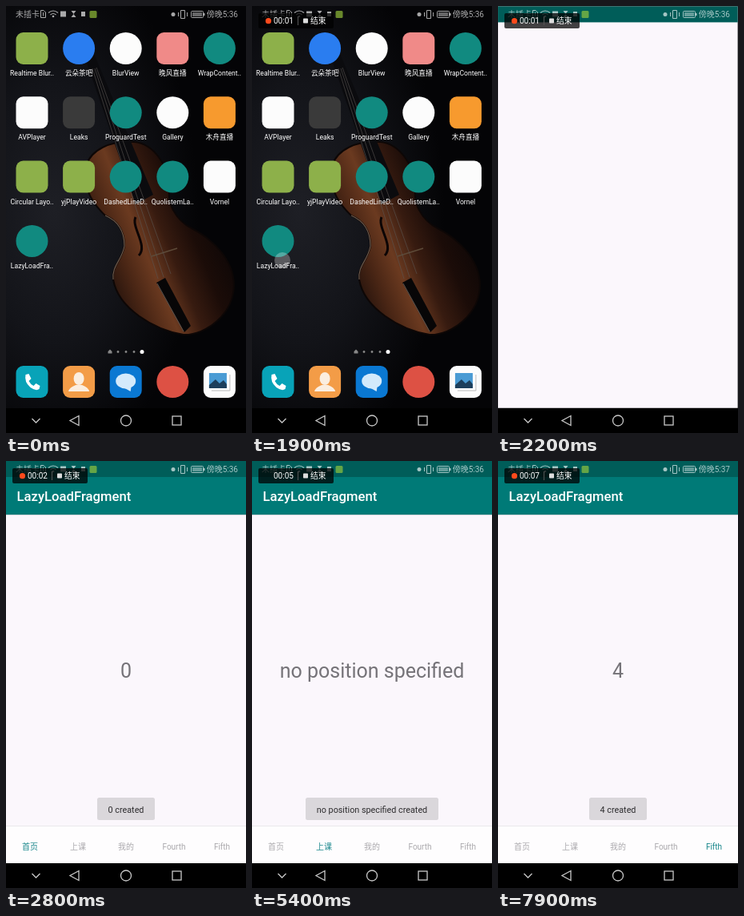
An HTML page for the animation above (8000 ms loop, 300 by 534 pixels).

```html
<!DOCTYPE html>
<html lang="zh-CN">
<head>
<meta charset="utf-8">
<title>Lazy tabs demo</title>
<style>
  html, body { margin: 0; width: 100%; height: 100%; overflow: hidden; background: #000; }
  svg { display: block; width: 100%; height: 100%; }
  text { font-family: Roboto, "Noto Sans CJK SC", "Noto Sans CJK", sans-serif; }
  .mid { text-anchor: middle; }
  .label { font-size: 8.6px; fill: #fff; }
  .status { font-size: 10px; fill: #fff; }
  .line { fill: none; stroke: #fff; }
  #nav .line { stroke: #c9c9c9; stroke-width: 1.3; }
</style>
</head>
<body>
<svg viewBox="0 0 300 534">
  <defs>
    <radialGradient id="wall" cx=".2" cy=".48" r=".6">
      <stop offset="0" stop-color="#1e1f25"/>
      <stop offset=".5" stop-color="#131419"/>
      <stop offset="1" stop-color="#040406"/>
    </radialGradient>
    <linearGradient id="wood" gradientUnits="userSpaceOnUse" x1="110" y1="325" x2="280" y2="255">
      <stop offset="0" stop-color="#1c0e0a"/>
      <stop offset=".2" stop-color="#4a2615"/>
      <stop offset=".36" stop-color="#6b3a20"/>
      <stop offset=".52" stop-color="#371b10"/>
      <stop offset=".7" stop-color="#1b0c08"/>
      <stop offset="1" stop-color="#080506"/>
    </linearGradient>
    <clipPath id="tabClip"><rect y="457" width="300" height="46"/></clipPath>
  </defs>

  <g id="home">
    <rect width="300" height="534" fill="url(#wall)"/>
    <path d="M100 200C106 180 130 168 160 170C185 172 203 200 205 228C200 245 212 268 232 278C255 290 285 315 285 350C284 385 250 412 222 411C185 405 140 378 134 342C132 325 145 318 148 300C148 280 138 268 124 262C106 245 94 222 100 200Z"
      fill="url(#wood)" stroke="#0d0706" stroke-width="2"/>
    <path d="M124 262C138 268 148 280 148 300C145 318 132 325 134 342" fill="none" stroke="#6d5a4c" stroke-width="1.200"/>
    <path d="M98 62L110 60L184 236L162 248Z" fill="#0b0b0e"/>
    <path d="M188 346L199 340L231 400L223 408Z" fill="#070607"/>
    <path d="M189 347L222 407" stroke="#5a534e"/>
    <path d="M182 313L214 303" stroke="#5d4a38" stroke-width="1.500"/>
    <path d="M108 78L190 341M111 78L197 339M113 77L206 335" stroke="#5b5753" stroke-width=".6"/>
    <path d="M162 264C156 276 178 300 166 312" fill="none" stroke="#0c0505" stroke-width="3"/>
    <g id="apps"></g>
    <g id="dock"></g>
    <path d="M127.500 432L130 429.500L132.500 432V434.500H127.500Z" fill="#888"/>
    <g fill="#888"><circle cx="140" cy="432.500" r="1.400"/><circle cx="150" cy="432.500" r="1.400"/><circle cx="160" cy="432.500" r="1.400"/></g>
    <circle cx="170" cy="432.500" r="2.500" fill="#fff"/>
    <circle id="touch" cx="38" cy="318" r="10" fill="#fff" opacity="0"/>
  </g>

  <g id="app">
    <rect width="300" height="503" fill="#fbf7fc"/>
    <rect width="300" height="20" fill="#005d59"/>
    <g id="content">
      <rect y="20" width="300" height="47" fill="#007a77"/>
      <rect y="67" width="300" height="1" fill="#d5d2d6"/>
      <text x="13.500" y="50" font-size="16.670" font-weight="500" fill="#fff">LazyLoadFragment</text>
      <text id="page" class="mid" x="150" y="271" font-size="25" fill="#757378"></text>
      <rect y="456" width="300" height="1" fill="#ebe8ec"/>
      <rect y="457" width="300" height="46" fill="#fefdfe"/>
      <circle id="ripple" cy="480" fill="#008577" clip-path="url(#tabClip)"/>
      <g id="tabs" font-size="10"></g>
      <g id="toast">
        <rect id="toastBox" y="421" height="28" rx="2.500" fill="#dad7db"/>
        <text id="toastText" class="mid" x="150" y="439.800" font-size="10.800" fill="#2d2c2e"></text>
      </g>
    </g>
  </g>

  <g id="status" opacity=".65">
    <text class="status" x="12" y="13.800">未插卡</text>
    <path class="line" d="M43.500 5.500H47L49.500 8V14.500H43.500ZM46.500 8V12.500"/>
    <path class="line" d="M53 8.500Q59 3.500 65 8.500M55.500 11Q59 8 62.500 11" stroke-width="1.200"/>
    <circle cx="59" cy="13" r="1.300" fill="#fff"/>
    <rect x="68" y="6.500" width="7" height="7" fill="#fff"/>
    <path d="M81.500 6H87.500L81.500 14H87.500Z" fill="#fff"/>
    <rect x="94" y="7" width="5" height="6" fill="#fff"/>
    <rect x="104.500" y="6" width="9" height="9" rx="1.500" fill="#9ccc3c"/>
    <circle cx="209" cy="10.500" r="2.500" fill="#fff"/>
    <path class="line" d="M218.500 5.500H223.500V15.500H218.500ZM215.500 8V13M226.500 8V13"/>
    <rect class="line" x="231.500" y="6.500" width="15" height="8" rx="1"/>
    <rect x="233" y="8" width="12" height="5" fill="#fff" opacity=".6"/>
    <rect x="247" y="9" width="1.500" height="3" fill="#fff"/>
    <text id="clock" class="status" x="290" y="13.800" text-anchor="end"></text>
  </g>

  <g id="recorder">
    <rect x="8" y="9" width="94" height="19" rx="2" fill="#000" opacity=".74"/>
    <circle id="dot" cx="20.500" cy="18.700" r="3.600" fill="#ff4a1c"/>
    <text id="timer" x="27" y="22.300" font-size="10" fill="#fff"></text>
    <path d="M57.500 13V24" stroke="#555"/>
    <rect x="64" y="15.500" width="6" height="6" rx=".8" fill="#ddd"/>
    <text x="73" y="22.300" font-size="9.800" fill="#fff">结束</text>
  </g>

  <g id="nav">
    <rect y="503" width="300" height="31" fill="#000"/>
    <path class="line" d="M32.500 516L37.500 521L42.500 516"/>
    <path class="line" d="M91 512.500V524.500L80 518.500Z"/>
    <circle class="line" cx="150" cy="518.500" r="6.500"/>
    <rect class="line" x="208" y="513" width="11" height="11"/>
  </g>
</svg>

<script>
const LOOP = 8000;
const $ = id => document.getElementById(id);
const clamp = v => Math.max(0, Math.min(1, v));
const ramp = (t, from, to) => clamp((t - from) / (to - from));

// Icon columns and rows on the home screen.
const colX = i => 32.5 + 58.6 * i;
const rowY = i => 53 + 80.3 * i;
const GREEN = '#8db04a', TEAL = '#118a80', WHITE = '#fcfcfc';
const apps = [
  ['Realtime Blur..', 'square', GREEN], ['云朵茶吧', 'circle', '#2a7df0'],
  ['BlurView', 'circle', WHITE], ['晚风直播', 'square', '#f08a88'],
  ['WrapContent..', 'circle', TEAL], ['AVPlayer', 'square', WHITE],
  ['Leaks', 'square', '#3a3a3a'], ['ProguardTest', 'circle', TEAL],
  ['Gallery', 'circle', WHITE], ['木舟直播', 'square', '#f79a2e'],
  ['Circular Layo..', 'square', GREEN], ['yjPlayVideo', 'square', GREEN],
  ['DashedLineD..', 'circle', TEAL], ['QuolistemLa..', 'circle', TEAL],
  ['Vornel', 'square', WHITE], ['LazyLoadFra..', 'circle', TEAL]
];
const square = (x, y, fill) =>
  `<rect x="${x - 20}" y="${y - 20}" width="40" height="40" rx="9" fill="${fill}"/>`;
const disc = (x, y, fill) => `<circle cx="${x}" cy="${y}" r="20" fill="${fill}"/>`;

$('apps').innerHTML = apps.map(([name, shape, fill], i) => {
  const x = colX(i % 5), y = rowY(Math.floor(i / 5));
  const icon = (shape === 'circle' ? disc : square)(x, y, fill);
  return `${icon}<text class="label mid" x="${x}" y="${y + 34}">${name}</text>`;
}).join('');

// Glyphs are drawn around the icon centre.
const glyphs = [
  ['#08a3b8', '<path d="M-8 -9L-4 -10L-1 -4L-4 -1Q-2 3 2 5L5 2L10 5L9 9Q5 12 -2 7Q-10 0 -8 -9Z" fill="#fff"/>'],
  ['#f39c47', '<ellipse cy="-4" rx="6.5" ry="8" fill="#fbeee0"/><path d="M-13 12Q-12 7 -4 4H4Q12 7 13 12Z" fill="#fbeee0"/>'],
  ['#0a78d2', '<ellipse cy="-1" rx="12.5" ry="9.5" fill="#d3eafb"/><path d="M-3 7L6 12L7 5Z" fill="#d3eafb"/>'],
  null,
  [WHITE, '<rect x="-13" y="-11" width="22" height="19" fill="#4a9bd4"/><path d="M-13 4L-5 -3L0 2L5 -2L9 3V8H-13Z" fill="#1d3f5c"/><path d="M-10 11H13V-9" fill="none" stroke="#bbb"/>']
];
$('dock').innerHTML = glyphs.map((g, i) => {
  const x = colX(i), y = 470;
  return g ? square(x, y, g[0]) + `<g transform="translate(${x} ${y})">${g[1]}</g>` : disc(x, y, '#dd5144');
}).join('');

$('tabs').innerHTML = ['首页', '上课', '我的', 'Fourth', 'Fifth']
  .map((s, i) => `<text class="mid" x="${30 + 60 * i}" y="486">${s}</text>`).join('');
const tabs = [...$('tabs').children];

// Page switches: start time, selected tab, text.
const pages = [
  { at: 0, tab: 0, text: '0' },
  { at: 4100, tab: 1, text: 'no position specified' },
  { at: 5800, tab: 2, text: '2' },
  { at: 7200, tab: 4, text: '4' }
];
// Toasts: fade-in start, fade-out start, page, box width.
const toasts = [
  { from: 2500, to: 4200, page: 0, width: 72 },
  { from: 4500, to: 5750, page: 1, width: 166 },
  { from: 5950, to: 7200, page: 2, width: 72 },
  { from: 7400, to: 9000, page: 3, width: 72 }
];
const ripples = [{ at: 5700, x: 150 }, { at: 7100, x: 270 }];
const latest = (list, key, t) => list.filter(e => e[key] <= t).pop();
const fade = (el, v) => el.setAttribute('opacity', v);

function drawWindow(t) {
  fade($('touch'), 0.28 * ramp(t, 1700, 1850) * (1 - ramp(t, 1950, 2100)));
  // The window grows out of the tapped icon.
  const p = ramp(t, 1950, 2250);
  const scale = 1 - 0.93 * Math.pow(1 - p, 3.6);
  fade($('app'), Math.min(1, p * 1.48));
  $('app').setAttribute('transform', `translate(33 318) scale(${scale}) translate(-33 -318)`);
  fade($('content'), ramp(t, 2250, 2400));
}

function drawPage(t) {
  const page = latest(pages, 'at', t);
  $('page').textContent = page.text;
  tabs.forEach((el, i) => el.setAttribute('fill', i === page.tab ? '#16858a' : '#aaa8ac'));

  const toast = latest(toasts, 'from', t);
  fade($('toast'), toast ? ramp(t, toast.from, toast.from + 200) * (1 - ramp(t, toast.to, toast.to + 200)) : 0);
  if (toast) {
    $('toastText').textContent = pages[toast.page].text + ' created';
    $('toastBox').setAttribute('x', 150 - toast.width / 2);
    $('toastBox').setAttribute('width', toast.width);
  }

  const ripple = latest(ripples, 'at', t);
  const age = ripple ? ramp(t, ripple.at, ripple.at + 450) : 1;
  fade($('ripple'), 0.12 * (1 - age));
  $('ripple').setAttribute('cx', ripple ? ripple.x : 0);
  $('ripple').setAttribute('r', 10 + 22 * age);
}

function drawRecorder(t) {
  fade($('recorder'), ramp(t, 50, 300));
  // The dot dims shortly before each second ticks over.
  const phase = (t + 600) % 1000;
  fade($('dot'), ramp(phase, 100, 280) * (1 - ramp(phase, 800, 1000)));
  $('timer').textContent = '00:0' + Math.max(0, Math.floor((t - 400) / 1000));
  $('clock').textContent = t < 7800 ? '傍晚5:36' : '傍晚5:37';
}

function draw(now) {
  const t = now % LOOP;
  drawWindow(t);
  drawPage(t);
  drawRecorder(t);
}

const start = performance.now();
function tick() {
  draw(performance.now() - start);
  requestAnimationFrame(tick);
}
tick();
</script>
</body>
</html>
```
